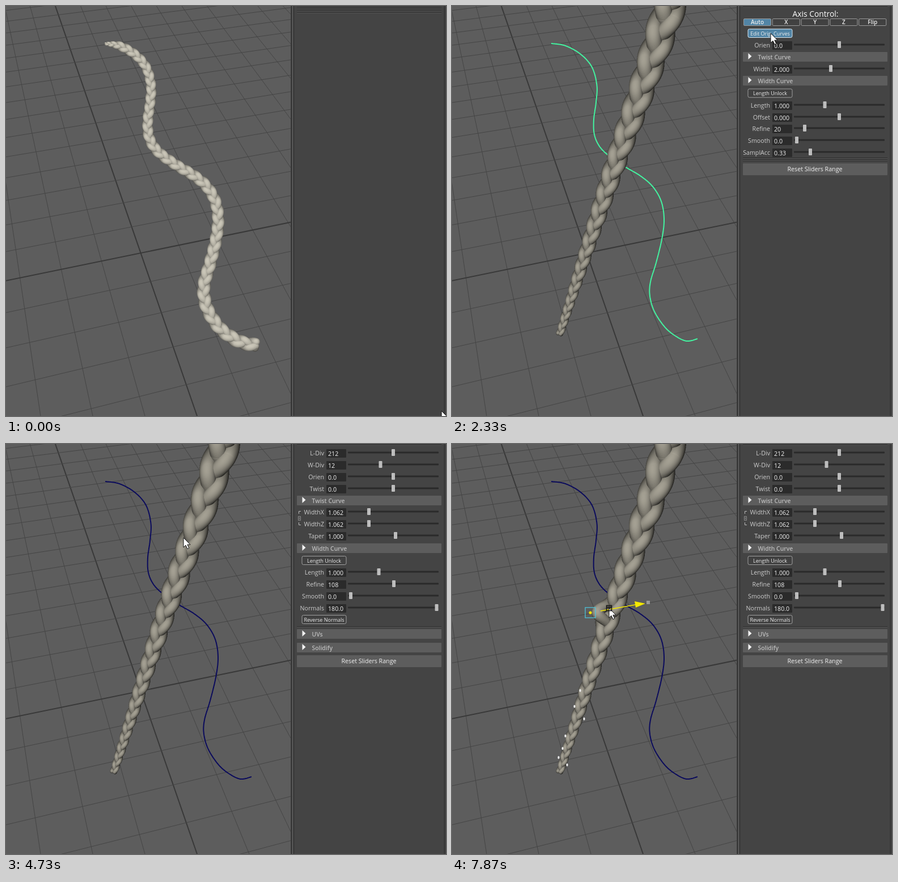
Recreate the animation shown at these times as an HTML page with a canvas. Size 776 by 722 pixels, loop 8 s.

```html
<!DOCTYPE html>
<html lang="en">
<head>
<meta charset="utf-8">
<title>Braid on a curve</title>
<style>
html, body { margin: 0; width: 100%; height: 100%; overflow: hidden; background: #444; }
svg, canvas { position: absolute; left: 0; top: 0; }
#back, #front { width: 776px; height: 722px; }
#view { width: 502px; height: 722px; }
text { font-family: "Open Sans", "Noto Sans", sans-serif; font-size: 10.67px; fill: #ccc; }
.mid { text-anchor: middle; }
.end { text-anchor: end; }
.small { font-size: 9px; fill: #eee; }
.tab { font-size: 10px; font-weight: 600; fill: #eee; }
.head { font-size: 10.4px; font-weight: 600; fill: #bbb; }
.white { fill: #f2f2f2; }
.title { font-size: 13.8px; fill: #fff; }
</style>
</head>
<body>
<svg id="back" viewBox="0 0 776 722">
  <rect width="502" height="722" fill="#5d5d5d"/>
  <g id="grid" stroke="#454545"></g>
  <path id="curve" fill="none" stroke-width="2"/>
</svg>
<canvas id="view" width="1004" height="1444"></canvas>
<svg id="front" viewBox="0 0 776 722">
  <g id="points" fill="#eee"></g>
  <g id="manip">
    <rect x="-9" y="-9" width="18" height="18" fill="none" stroke="#4fc3d9" stroke-width="1.3"/>
    <circle r="2.6" fill="#f4e800"/>
    <path d="M18-3L80-14" stroke="#f4e800" stroke-width="1.3"/>
    <path d="M78-20L97-16L80-9Z" fill="#f4e800"/>
    <rect x="99" y="-21" width="6" height="6" fill="#999"/>
  </g>
  <rect x="502" width="274" height="722" fill="#444"/>
  <path d="M503.5 0V722M507.5 0V722" stroke="#363636" stroke-width="2"/>
  <path d="M505.5 0V722" stroke="#6b6b6b"/>
  <path d="M773.5 0V722" stroke="#393939" stroke-width="3"/>
  <g id="empty"></g>
  <g id="braidPanel"></g>
  <g id="tubePanel"></g>
  <g id="cursor">
    <path d="M0 0V17L4 13.3L7 19.6L9.8 18.3L6.9 12.2H12Z" fill="#fff" stroke="#111"/>
    <path id="grip" d="M-4.5-4.5H4.5V4.5H-4.5ZM-4.5-1.5H4.5" fill="none" stroke="#111" stroke-width="1.4"/>
  </g>
</svg>
<script>
const LOOP = 8000, STEP = 200 / 3, TAU = Math.PI * 2;
const el = id => document.getElementById(id);
const show = (id, on) => { el(id).style.display = on ? '' : 'none'; };

// Ground grid: two line families, each meeting at its own vanishing point
const HORIZON = -680;
const ray = (vx, x, y, k, extra = '') =>
  `<path d="M${vx} ${HORIZON}L${vx + (x - vx) * k} ${HORIZON + (y - HORIZON) * k}"${extra}/>`;

function buildGrid() {
  const axis = ' stroke="#393939" stroke-width="2"';
  let out = '';
  for (let u = -5; u <= 14; u++) out += ray(-148.5, 337 + 92 * u, 722, 1.2, u ? '' : axis);
  for (let v = -30; v <= 8; v++) {
    const y = 435 + 48 * v / (1 - 0.043 * v);
    out += ray(5673, 87 + 0.3463 * y, y, 1.1, v ? '' : axis);
  }
  el('grid').innerHTML = out;
}

// Catmull-Rom samples, about one per pixel
function spline(pts) {
  const out = [];
  for (let i = 0; i < pts.length - 1; i++) {
    const a = pts[Math.max(0, i - 1)], b = pts[i], c = pts[i + 1], d = pts[Math.min(pts.length - 1, i + 2)];
    const n = Math.ceil(Math.hypot(c[0] - b[0], c[1] - b[1]));
    for (let j = 0; j < n; j++) {
      const t = j / n;
      out.push([0, 1].map(m => b[m] + 0.5 * t * (c[m] - a[m] +
        t * (2 * a[m] - 5 * b[m] + 4 * c[m] - d[m] + t * (3 * (b[m] - c[m]) + d[m] - a[m])))));
    }
  }
  out.push(pts[pts.length - 1]);
  return out;
}

const bend = [[175, 66], [200, 70], [227, 85], [247, 108], [255.5, 140], [254, 170], [250, 200], [251, 226],
  [260, 247], [277, 264], [305, 283], [332, 299], [354, 318], [369, 344], [374, 376], [370, 411],
  [360, 452], [350, 486], [349, 511], [357, 538], [375, 565], [394, 581]];
const curvePts = [...bend, [414, 590], [433, 586]];
const curlyPts = [...bend, [415, 592], [440, 597]];
const polePts = [[392, -30], [377, 20], [333, 150], [285, 285], [237, 430], [190, 577]];

// Three woven tubes, drawn as spheres with a depth buffer at double size
function braid({ path, half, lobe, phase, tone, ambient, bulge = 0 }) {
  const w = 1004, h = 1444;
  const canvas = document.createElement('canvas');
  canvas.width = w;
  canvas.height = h;
  const ctx = canvas.getContext('2d');
  const img = ctx.createImageData(w, h), depth = new Float32Array(w * h).fill(-1e9);

  function ball(cx, cy, cz, r, size) {
    const x0 = Math.max(0, Math.ceil(cx - r)), x1 = Math.min(w - 1, cx + r);
    const y0 = Math.max(0, Math.ceil(cy - r)), y1 = Math.min(h - 1, cy + r);
    for (let y = y0; y <= y1; y++) for (let x = x0; x <= x1; x++) {
      const dx = x - cx, dy = y - cy, rest = r * r - dx * dx - dy * dy;
      if (rest < 0) continue;
      const dz = Math.sqrt(rest), z = cz + dz, i = y * w + x;
      if (z <= depth[i]) continue;
      depth[i] = z;
      const light = Math.max(0, (-0.12 * dx - 0.3 * dy + 0.95 * dz) / r);
      const hollow = Math.min(1, Math.max(0.3, 0.68 + 0.5 * z / size));
      const shade = (ambient + (1 - ambient) * light) * hollow;
      for (let m = 0; m < 3; m++) img.data[i * 4 + m] = tone[m] * shade;
      img.data[i * 4 + 3] = 255;
    }
  }

  const pts = spline(path), last = pts.length - 1;
  let turn = phase;
  for (let i = 0; i <= last; i++) {
    const [x, y] = pts[i], a = pts[Math.max(0, i - 1)], b = pts[Math.min(last, i + 1)];
    const len = Math.hypot(b[0] - a[0], b[1] - a[1]) || 1;
    const nx = (b[1] - a[1]) / len, ny = (a[0] - b[0]) / len;
    const size = half(y, i / last);
    turn += len / 2 * TAU / (3 * lobe * size);
    for (let k = 0; k < 3; k++) {
      const f = turn + k * TAU / 3, off = 0.5 * size * Math.sin(f);
      const push = bulge * 18 * Math.max(0, -Math.sin(f)) * Math.exp(-(((y - 302) / 14) ** 2));
      ball(2 * (x + nx * off - push), 2 * (y + ny * off), -0.7 * size * Math.sin(2 * f) + push,
        size * (1 + push / 90), 2 * size);
    }
  }
  ctx.putImageData(img, 0, 0);
  return canvas;
}

const curly = { path: curlyPts, lobe: 1.7, phase: 0, tone: [203, 199, 185], ambient: 0.6,
  half: (y, u) => (8.7 + 4.2 * u) * Math.min(1, 0.3 + u * 17) };
const pole = { path: polePts, lobe: 1.9, phase: -4.14, tone: [164, 160, 147], ambient: 0.28,
  half: y => 30.8 - 0.041 * y };
const cache = {};
let shown = '';

function showBraid(straight, level) {
  const key = straight ? 'pole' + level : 'curly';
  if (key === shown) return;
  shown = key;
  cache[key] = cache[key] || braid(straight ? { ...pole, bulge: level / 8 } : curly);
  const ctx = el('view').getContext('2d');
  ctx.clearRect(0, 0, 1004, 1444);
  ctx.drawImage(cache[key], 0, 0);
}

// Panel parts
const label = (x, y, s, cls) => `<text x="${x}" y="${y}" class="${cls}">${s}</text>`;
const box = (x, y, w, h, fill, extra = '') =>
  `<rect x="${x}" y="${y}" width="${w}" height="${h}" fill="${fill}" ${extra}/>`;
const rule = y => `<path d="M513 ${y + .5}H768" stroke="#2c2c2c"/><path d="M513 ${y + 1.5}H768" stroke="#555"/>`;
const row = (y, name, value, x) => label(561, y + 4, name, 'end') +
  box(565, y - 7, 35, 15, '#2b2b2b', 'rx="1"') + label(568, y + 4.5, value, 'white') +
  box(603, y - 2.5, 160, 3, '#2a2a2a', 'rx="1"') + box(x - 3, y - 7, 6, 12, '#bdbdbd', 'rx="1"');
const header = (y, name) => box(513, y - 9, 255, 17, '#5d5d5d', 'rx="1"') +
  `<path d="M522.5 ${y - 7}L528.5 ${y - 1.5}L522.5 ${y + 4}Z" fill="#f2f2f2"/>` + label(539.5, y + 4, name, 'head');
const button = (y, name, id = '') =>
  box(522, y - 7.5, 78, 15, '#414141', `rx="2.5" stroke="#a0a0a0" ${id && `id="${id}"`}`) +
  label(561, y + 3.5, name, 'mid small');
const reset = y => box(513, y - 10, 255, 21, '#5d5d5d', 'rx="1"') + label(640, y + 4, 'Reset Sliders Range', 'mid white');

function buildPanels() {
  el('empty').innerHTML = [2, 5, 8, 11].map(rule).join('');
  el('braidPanel').innerHTML = rule(1) + label(641, 19, 'Axis Control:', 'mid title') +
    ['Auto', 'X', 'Y', 'Z', 'Flip'].map((s, i) =>
      box(514.5 + 50.8 * i, 22.5, 48, 12, i ? '#414141' : '#5285a6', 'rx="1.5" stroke="#999"') +
      label(538.5 + 50.8 * i, 32, s, 'mid tab')).join('') +
    button(48, 'Edit Orig. Curves', 'edit') + row(69, 'Orien', '0.0', 683) +
    header(90, 'Twist Curve') + row(111, 'Width', '2.000', 668) + header(132, 'Width Curve') +
    button(153.5, 'Length Unlock') + row(175, 'Length', '1.000', 657.5) + row(196, 'Offset', '0.000', 683) +
    row(216, 'Refine', '20', 622) + row(237, 'Smooth', '0.0', 608) + row(258, 'SamplAcc', '0.33', 632) +
    [267, 270, 273].map(rule).join('') + reset(287);
  el('tubePanel').innerHTML = rule(1) + row(16, 'L-Div', '212', 683) + row(37, 'W-Div', '12', 660.5) +
    row(58, 'Orien', '0.0', 683) + row(79, 'Twist', '0.0', 683) + header(100, 'Twist Curve') +
    row(120, 'WidthX', '1.062', 640) + row(141, 'WidthZ', '1.062', 640) +
    '<path d="M520 118.500H516.500V123M516.500 138V142.500H520" fill="none" stroke="#bbb"/>' +
    '<path d="M515.500 127.500H519.500V134.500H515.500ZM517.500 129V133" fill="none" stroke="#888"/>' +
    row(162, 'Taper', '1.000', 687) + header(184, 'Width Curve') + button(205, 'Length Unlock') +
    row(226, 'Length', '1.000', 657.5) + row(247, 'Refine', '108', 684) + row(268, 'Smooth', '0.0', 608) +
    row(289, 'Normals', '180.0', 759.5) + button(309, 'Reverse Normals') + rule(321) +
    header(335, 'UVs') + header(359, 'Solidify') + reset(382);
}

const dots = [[266, 293], [226, 434], [216, 462], [233, 484], [200, 514], [195, 536], [188, 552], [203, 565]];

// Pointer stops: time, x, y
const stops = [[0, 768, 713], [130, 768, 713], [600, 240, 306], [930, 362, 430], [1000, 362, 430],
  [1130, 432, 445], [1800, 530, 130], [2200, 562, 48], [2670, 562, 48], [3130, 288, 130], [3470, 378, 172],
  [4270, 378, 172], [4400, 313, 165], [4950, 313, 165], [5270, 262, 124], [5400, 254, 135], [5800, 250, 125],
  [6200, 350, 362], [6470, 272, 308], [6730, 272, 308], [6930, 299, 286], [7130, 299, 286],
  [7870, 277, 289], [LOOP, 277, 289]];
const ease = k => k * k * (3 - 2 * k);

function pointer(t) {
  const i = Math.max(1, stops.findIndex(s => s[0] >= t));
  const [t0, x0, y0] = stops[i - 1], [t1, x1, y1] = stops[i];
  const k = ease(Math.min(1, (t - t0) / (t1 - t0)));
  return [x0 + (x1 - x0) * k, y0 + (y1 - y0) * k];
}

function draw(time) {
  // the screen refreshes fifteen times a second
  const t = Math.min(LOOP - 1, Math.floor((time + 4) / STEP) * STEP + 1);
  const drag = ease(Math.min(1, Math.max(0, (t - 7130) / 735)));
  showBraid(t >= 2330, Math.round(drag * 8));

  show('curve', t >= 1000);
  el('curve').setAttribute('stroke', t < 3600 ? '#43f3a0' : '#0b0b5c');
  show('empty', t < 1000);
  show('braidPanel', t >= 1000 && t < 3600);
  show('tubePanel', t >= 3600);
  el('edit').setAttribute('fill', t >= 2270 ? '#5285a6' : '#414141');
  el('edit').setAttribute('stroke', t >= 2270 ? '#d5e4ee' : '#a0a0a0');

  show('points', t >= 5000);
  const picked = el('points').firstChild;
  picked.setAttribute('fill', t >= 6200 ? '#f4e800' : '#eee');
  picked.style.display = t >= 6870 ? 'none' : '';
  show('manip', t >= 6870);
  el('manip').setAttribute('transform', `translate(${266 - 22 * drag} ${293 + 4 * drag})`);

  show('grip', t >= 6470);
  el('cursor').setAttribute('transform', `translate(${pointer(t).map(Math.round).join(' ')})`);
}

buildGrid();
buildPanels();
el('curve').setAttribute('d', 'M' + spline(curvePts).map(p => p.map(n => n.toFixed(1)).join(' ')).join('L'));
el('points').innerHTML = dots.map(([x, y]) => box(x - 1.5, y - 2.5, 3, 5, 'inherit', 'rx="1.5"')).join('');
for (const dot of el('points').children) dot.setAttribute('fill', '#eee');

// prepare every braid pose before starting
showBraid(false, 0);
for (let i = 0; i <= 8; i++) showBraid(true, i);

const start = performance.now();
function frame(now) {
  draw(Math.max(0, now - start) % LOOP);
  requestAnimationFrame(frame);
}
draw(0);
requestAnimationFrame(frame);
</script>
</body>
</html>
```
